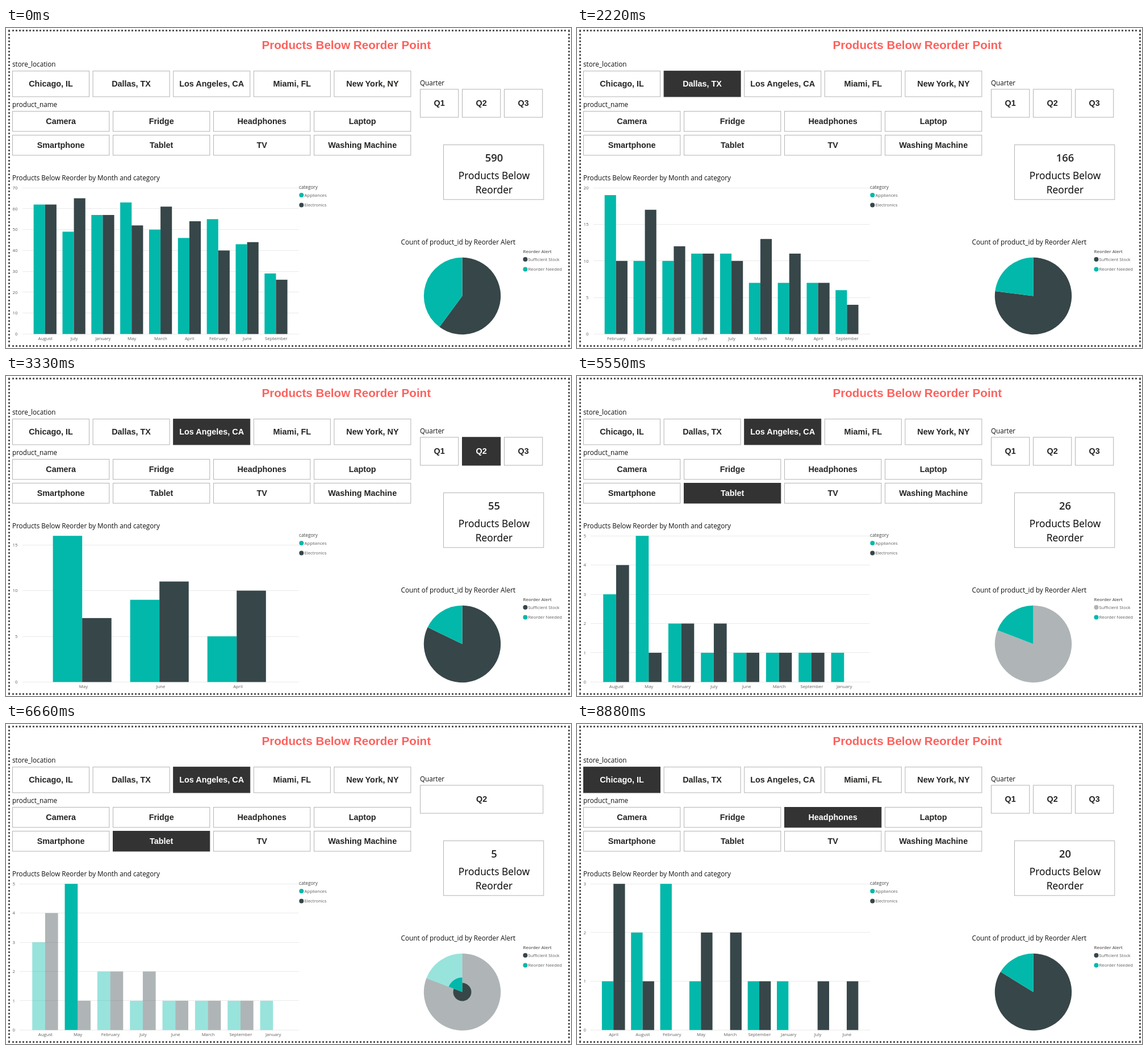
An HTML page that plays this animation: 995x563 px, repeating every 9.99 s.

```html
<!DOCTYPE html>
<html lang="en">
<head>
<meta charset="utf-8">
<title>Reorder dashboard</title>
<style>
html, body { margin: 0; width: 100%; height: 100%; overflow: hidden; background: #fff; }
svg { display: block; width: 995px; height: 563px; font-family: "Open Sans", "Noto Sans", sans-serif; }
line { shape-rendering: crispEdges; }
.edge { position: absolute; left: 4px; top: 3px; width: 989px; height: 558px; box-sizing: border-box; border: 3px dotted #555; }
.bold { font: bold 14.4px "Liberation Sans", Arial, sans-serif; }
.head { font-size: 11.7px; fill: #111; }
.small { font-size: 7.75px; fill: #605e5c; }
</style>
</head>
<body>
<svg id="stage" viewBox="0 0 995 563"></svg>
<div class="edge"></div>
<script>
const STEP = 1110;
const TEAL = "#01b8aa", DARK = "#374649", INK = "#252423", DIM = 0.4;
const STORES = ["Chicago, IL", "Dallas, TX", "Los Angeles, CA", "Miami, FL", "New York, NY"];
const PRODUCTS = ["Camera", "Fridge", "Headphones", "Laptop", "Smartphone", "Tablet", "TV", "Washing Machine"];
const FULL = { Jan: "January", Feb: "February", Mar: "March", Apr: "April", May: "May", Jun: "June",
  Jul: "July", Aug: "August", Sep: "September" };
const TABLET_BARS = "Aug 3 4,May 5 1,Feb 2 2,Jul 1 2,Jun 1 1,Mar 1 1,Sep 1 1,Jan 1 0";

// bars: month, appliances, electronics; share: sufficient stock; pick: highlighted bar
const SCENES = [
  { total: 590, max: 70, tick: 10, share: 0.601,
    bars: "Aug 62 62,Jul 49 65,Jan 57 57,May 63 52,Mar 50 61,Apr 46 54,Feb 55 40,Jun 43 44,Sep 29 26" },
  { on: ["Chicago, IL"], total: 145, max: 20, tick: 5, share: 0.79,
    bars: "Aug 17 12,Jul 12 14,Jan 12 10,May 11 10,Mar 9 13,Apr 8 12,Feb 9 7,Jun 8 7,Sep 5 4" },
  { on: ["Dallas, TX"], total: 166, max: 20, tick: 5, share: 0.77,
    bars: "Feb 19 10,Jan 10 17,Aug 10 12,Jun 11 11,Jul 11 10,Mar 7 13,May 7 11,Apr 7 7,Sep 6 4" },
  { on: ["Los Angeles, CA", "Q2"], total: 55, max: 16, tick: 5, share: 0.8217,
    bars: "May 16 7,Jun 9 11,Apr 5 10" },
  { on: ["Los Angeles, CA", "Smartphone"], total: 24, max: 4, tick: 1, share: 0.82,
    bars: "May 4 2,Aug 3 2,Jun 2 2,Jul 2 2,Jan 1 2,Mar 1 2,Feb 1 1,Apr 1 1,Sep 1 0" },
  { on: ["Los Angeles, CA", "Tablet"], total: 26, max: 5, tick: 1, share: 0.8086, bars: TABLET_BARS, needed: true },
  { on: ["Los Angeles, CA", "Tablet"], total: 5, max: 5, tick: 1, share: 0.8086, bars: TABLET_BARS,
    pick: "May 0", wide: "Q2" },
  { on: ["Chicago, IL", "Tablet"], total: 4, max: 4, tick: 1, share: 0.763, pick: "Apr 1", wide: "Q2", cut: true,
    bars: "Apr 2 4,Jul 2 3,Mar 2 3,May 2 3,Jan 2 1,Jun 1 1,Aug 0 1,Feb 0 1" },
  { on: ["Chicago, IL", "Headphones"], total: 20, max: 3, tick: 1, share: 0.838,
    bars: "Apr 1 3,Aug 2 1,Feb 3 0,May 1 2,Mar 0 2,Sep 1 1,Jan 1 0,Jul 0 1,Jun 0 1" }
];

const text = (x, y, str, attrs = "") => `<text x="${x}" y="${y}" ${attrs}>${str}</text>`;
const mid = (x, y, str, attrs = "") => text(x, y, str, `text-anchor="middle" ${attrs}`);
const rect = (x, y, w, h, attrs) => `<rect x="${x}" y="${y}" width="${w}" height="${h}" ${attrs}/>`;
const dot = (x, y, fill, opacity = 1) => `<circle cx="${x}" cy="${y}" r="4" fill="${fill}" opacity="${opacity}"/>`;

function button(x, y, w, h, label, on = []) {
  const active = on.includes(label);
  const style = active ? 'fill="#333" stroke="#333"' : 'fill="#fff" stroke="#b3b3b3"';
  return rect(x + 0.5, y + 0.5, w - 1, h - 1, style) +
    mid(x + w / 2, y + h / 2 + 4.8, label, `class="bold" fill="${active ? "#fff" : INK}"`);
}

function slicers({ on, wide, cut }) {
  let out = STORES.map((s, i) => button(11 + i * 141.6, 75.2, 136, 46.2, s, on)).join("");
  out += PRODUCTS.map((p, i) => button(11 + (i % 4) * 177, i < 4 ? 146 : 188, 171.3, 36.4, p, on)).join("");
  out += wide ? button(729, 107.3, 217.3, 50.3, wide)
    : ["Q1", "Q2", "Q3"].map((q, i) => button(729 + i * 74, 107.3, 68.3, 50.3, q, on)).join("");
  if (cut) out += rect(686, 95, 30, 28, 'fill="#fff"');
  return out;
}

function chart({ bars, max, tick, pick }) {
  const rows = bars.split(",").map(r => r.split(" "));
  const left = max > 9 ? 29 : 24, base = 538.4, height = 257.2;
  const few = rows.length < 4;
  const pitch = (516 - left) / (rows.length + 0.58);
  const barW = pitch * (few ? 0.379 : 0.396);
  let out = "";
  for (let v = 0; v <= max; v += tick) {
    const y = base - height * v / max;
    out += `<line x1="${left}" x2="516" y1="${y}" y2="${y}" stroke="#eaeaea"/>`;
    const x = max > 9 && v < 10 ? 16 : 11.5;
    out += text(x, y + 2.8, v, 'class="small"');
  }
  rows.forEach(([month, ...vals], i) => {
    const cx = left + pitch * (i + 0.79);
    vals.forEach((v, k) => {
      const h = height * v / max;
      const x = cx - (few ? 2.3 : 0.4) + (k - 1) * barW;
      const opacity = pick && pick !== `${month} ${k}` ? DIM : 1;
      out += rect(x, base - h, barW, h, `fill="${k ? DARK : TEAL}" opacity="${opacity}"`);
    });
    out += mid(cx, 549, FULL[month], 'class="small"');
  });
  return out;
}

function slice(r, from, to, fill, opacity = 1) {
  const at = f => {
    const a = f * 2 * Math.PI;
    return `${803.5 + r * Math.sin(a)} ${471.5 - r * Math.cos(a)}`;
  };
  const large = to - from > 0.5 ? 1 : 0;
  return `<path d="M803.5 471.5L${at(from)}A${r} ${r} 0 ${large} 1 ${at(to)}Z" fill="${fill}" opacity="${opacity}"/>`;
}

function pie({ share, pick, needed }) {
  let out = slice(67.7, 0, share, DARK, pick || needed ? DIM : 1) + slice(67.7, share, 1, TEAL, pick ? DIM : 1);
  if (pick) out += slice(16, 0, share, DARK) + slice(25.5, share, 1, TEAL);
  return out + dot(914.5, 407, DARK, needed ? DIM : 1) + dot(914.5, 424.5, TEAL);
}

const FRAME =
  rect(0, 0, 995, 563, 'fill="#fff"') +
  mid(599.3, 37, "Products Below Reorder Point", 'class="bold" style="font-size:20.6px" fill="#fd625e"') +
  text(11, 68, "store_location", 'class="head"') +
  text(11, 139, "product_name", 'class="head"') +
  text(729, 101, "Quarter", 'class="head"') +
  text(11, 267.5, "Products Below Reorder by Month and category", 'class="head"') +
  text(695.5, 380.5, "Count of product_id by Reorder Alert", 'class="head" style="font-size:11.8px"') +
  rect(770.5, 205.5, 176.3, 96.3, 'fill="#fff" stroke="#b3b3b3"') +
  mid(859.5, 266, "Products Below", 'font-size="17.4"') +
  mid(859.5, 291, "Reorder", 'font-size="17.4"') +
  text(516, 283, "category", 'font-size="8.2" fill="#444"') +
  dot(520.3, 294, TEAL) + text(525.5, 296.6, "Appliances", 'class="small"') +
  dot(520.3, 311.5, DARK) + text(525.5, 314.2, "Electronics", 'class="small"') +
  text(910.5, 395.5, "Reorder Alert", 'font-size="7.8" font-weight="600" fill="#605e5c"') +
  text(919.5, 409.5, "Sufficient Stock", 'class="small"') +
  text(919.5, 427, "Reorder Needed", 'class="small"');

const stage = document.getElementById("stage");
const start = performance.now();
let shown = -1;

function draw(now) {
  const i = Math.floor(Math.max(0, now - start) / STEP) % SCENES.length;
  if (i !== shown) {
    shown = i;
    const s = SCENES[i];
    stage.innerHTML = FRAME + slicers(s) + chart(s) + pie(s) +
      mid(859.5, 235, s.total, `font-size="18.4" font-weight="600" fill="${INK}"`);
  }
  requestAnimationFrame(draw);
}
draw(start);
</script>
</body>
</html>
```
